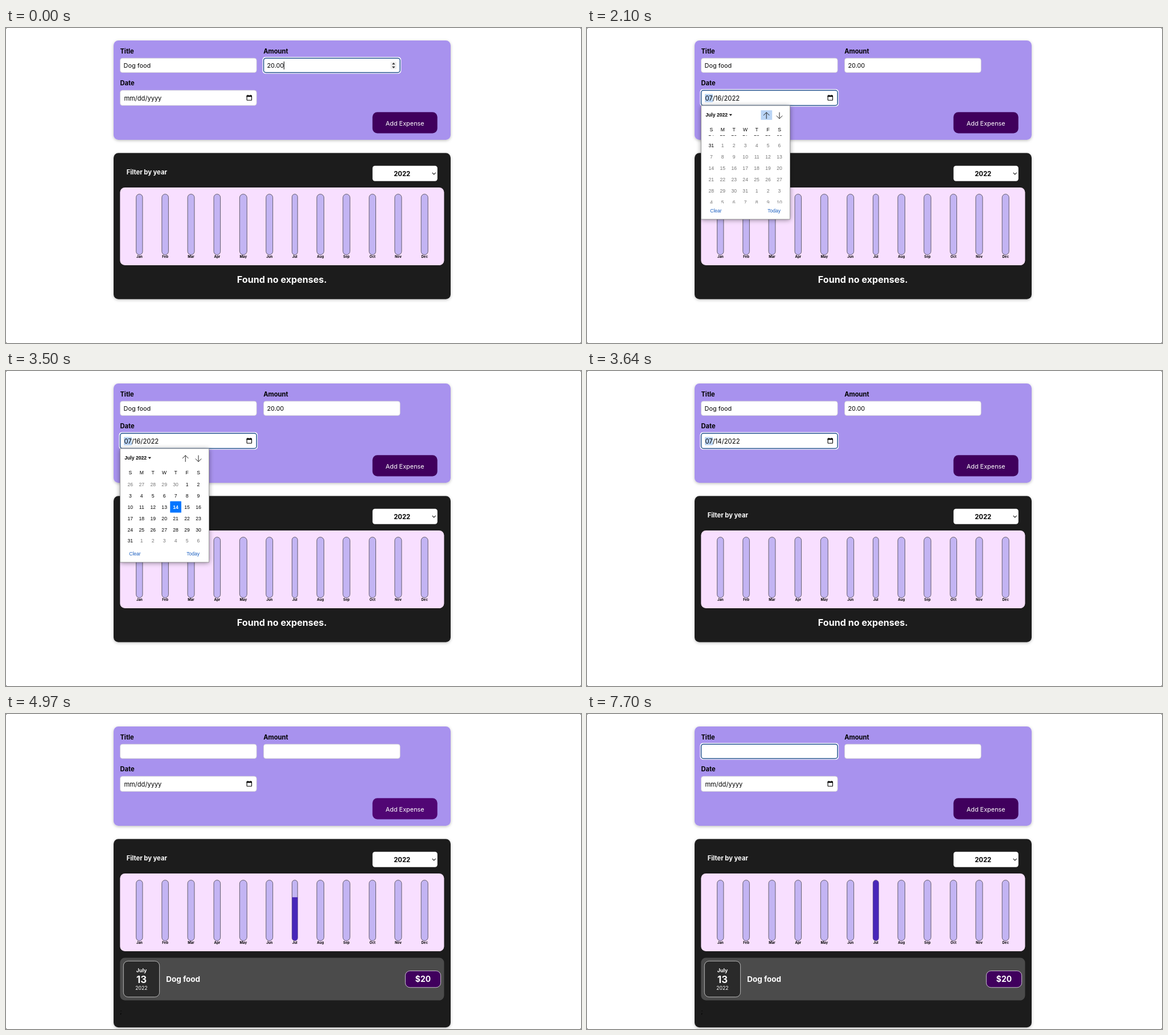
An HTML page that plays this animation: 1010 px wide and 555 px high, repeating every 8 s.

```html
<!DOCTYPE html>
<html lang="en">
<head>
<meta charset="utf-8">
<title>Expense tracker</title>
<style>
  html, body { margin: 0; width: 100%; height: 100%; overflow: hidden; background: #fff; }
  svg { display: block; font-family: Inter, "Open Sans", sans-serif; font-size: 10.9px; }
  .b { font-weight: 700; }
  .cal { font-family: "Liberation Sans", Arial, sans-serif; font-size: 8.6px; }
</style>
</head>
<body>
<svg id="stage" width="1010" height="555" viewBox="0 0 1010 555">
  <defs>
    <filter id="soft" x="-5%" y="-10%" width="110%" height="120%">
      <feDropShadow dx="0" dy="1.4" stdDeviation="2.8" flood-opacity=".26"/>
    </filter>
    <filter id="deep" x="-15%" y="-15%" width="130%" height="130%">
      <feDropShadow dx="0" dy="1" stdDeviation="4.5" flood-opacity=".45"/>
    </filter>
    <clipPath id="weeks"><rect x="202" y="189" width="153" height="120"/></clipPath>
    <clipPath id="july"><rect x="502.5" y="293" width="9.8" height="106.3" rx="4.9"/></clipPath>
  </defs>
  <g id="view"></g>
</svg>
<script>
const LOOP = 8000;
const MONTHS = 'Jan Feb Mar Apr May Jun Jul Aug Sep Oct Nov Dec'.split(' ');
const BAR_X = [234.3, 279.6, 325, 370.8, 416.8, 462.7, 507.3, 552.2, 598, 643.7, 688.9, 735.2];
const BAR_W = [12, 12.3, 12.6, 12.3, 13.6, 12.6, 10.5, 13.2, 13, 12.3, 12.8, 12.7];
const HOVER = '#b9d4f6', BLUE = '#0075ff';
const view = document.getElementById('view');

const clamp = (v, lo, hi) => Math.min(hi, Math.max(lo, v));
const rect = (x, y, w, h, r, fill, more = '') =>
  `<rect x="${x}" y="${y}" width="${w}" height="${h}" rx="${r}" fill="${fill}" ${more}/>`;
const text = (x, y, s, more = '') => `<text x="${x}" y="${y}" ${more}>${s}</text>`;
const mid = (x, y, s, more = '') => text(x, y, s, 'text-anchor="middle" ' + more);
const line = (d, color = '#000', w = 1) =>
  `<path d="${d}" fill="none" stroke="${color}" stroke-width="${w}"/>`;
const shape = (d, fill = '#000') => `<path d="${d}" fill="${fill}"/>`;
const bold = (size, fill = '#000') => `class="b" font-size="${size}" fill="${fill}"`;
const stroke = (color, w = .7) => `stroke="${color}" stroke-width="${w}"`;

function field(x, y, h, focused) {
  const ring = rect(x - 1.7, y - 1.7, 243.6, h + 3.4, 5, '#fff');
  return (focused ? ring : '') +
    rect(x + .35, y + .35, 239.6, h - .7, 4, '#fff', focused ? stroke('#23508f', 1.5) : stroke('#ccc'));
}

const caret = (x, y) => rect(x, y, 1, 14, 0, '#000');

function form(t) {
  const sent = t >= 4830;
  const onAmount = t < 910, onDate = t >= 910 && t < 4690, onTitle = t >= 6160;
  const date = t < 2030 || sent ? 'mm/dd/yyyy' : t < 3570 ? '07/16/2022' : '07/14/2022';
  const empty = date[0] === 'm';
  const hover = t >= 4480 && t < 5250;
  let s = rect(189, 22, 592, 175, 8.5, '#a892ee', 'filter="url(#soft)"') +
    text(200.4, 44.5, 'Title', bold(11.2)) + text(452.2, 44.5, 'Amount', bold(11.2)) +
    text(200.4, 101.4, 'Date', bold(11.2)) +
    field(200.2, 52.8, 26, onTitle) + field(452.2, 52.8, 26, onAmount) + field(200.2, 109.5, 27.3, onDate);

  if (!sent) s += text(206.6, 70, 'Dog food') + text(458.4, 70, '20.00');
  if (onAmount) {
    s += rect(675.5, 59.5, 10.5, 13, 1, '#efefef') +
      shape('M678 64.3l2.8-3.4 2.8 3.4zM678 67.7l2.8 3.4 2.8-3.4z', '#333');
    if (t < 420) s += caret(487.8, 59);
  }
  if (onTitle && (t < 6650 || t >= 7210 && t < 7700)) s += caret(206.6, 58.6);

  if (onDate) s += rect(207, 116.3, empty ? 20.3 : 14, 14.4, 0, HOVER);
  s += text(207.4, 127.8, date, `font-size="${empty ? 11.1 : 11.3}"`) +
    rect(423.1, 119.3, 8.4, 8, .6, 'none', stroke('#000', 1.1)) +
    shape('M422.6 118.8h9.4v2.5h-9.4zM424.2 117.8h1.2v1.5h-1.2zM429.2 117.8h1.2v1.5h-1.2z');

  return s + rect(643.7, 148.3, 114, 37.3, 8.5, hover ? '#510674' : '#40005d') +
    mid(700.7, 171.6, 'Add Expense', 'fill="#fff"');
}

function chart(t) {
  const k = clamp((t - 4830) / 300, 0, 1);
  const fill = 106.3 * (1 - (1 - k) ** 2);
  let s = rect(200.3, 281, 569.2, 137, 8.5, '#f8dfff');
  MONTHS.forEach((name, i) => {
    const w = BAR_W[i] - .7;
    s += rect(BAR_X[i] - w / 2, 292.7, w, 106.8, w / 2, '#c3b4f3', stroke('#313131')) +
      mid(BAR_X[i], 405.4, name, bold(6));
  });
  return s + rect(502, 399.3 - fill, 11, fill, 0, '#4826b9', 'clip-path="url(#july)"');
}

function expenses(t) {
  const filled = t >= 4830;
  const s = rect(189, 220.2, 592, filled ? 332 : 257.6, 8.5, '#1f1f1f', 'filter="url(#soft)"') +
    text(211.7, 257.9, 'Filter by year', bold(11.2, '#fff')) +
    rect(643.8, 242.8, 114, 27, 4.2, '#fff') + mid(695.7, 260.6, '2022', bold(11.3)) +
    line('M748.7 254.8l3 3.2 3-3.2', '#222', 1.1) + chart(t);
  if (!filled) return s + mid(484.8, 448.6, 'Found no expenses.', bold(16.1, '#fff'));
  return s + rect(200.3, 429.5, 569.2, 75, 8.5, '#4b4b4b') +
    rect(206.3, 435.3, 63.3, 63.3, 8.2, '#2a2a2a', stroke('#ececec')) +
    mid(238, 455.1, 'July', bold(8.8, '#fff')) + mid(238, 473.8, '13', bold(16.8, '#fff')) +
    mid(238, 485.7, '2022', 'font-size="8.7" fill="#fff"') +
    text(281.2, 472.4, 'Dog food', bold(13.5, '#fff')) +
    rect(701.4, 452.6, 62.2, 29.2, 8.2, '#40005d', stroke('#fff')) +
    mid(732.4, 472.4, '$20', bold(13.9, '#fff')) + text(200.3, 527.5, ';');
}

function picker(t) {
  if (t < 1050 || t >= 3640) return '';
  const month = t < 2030 ? 7 : 6;
  // Weeks are counted from June 26; the view slides from week 5 to week 0.
  const top = clamp((2450 - t) / 70 * .925, 0, 5);
  const picked = t < 3430 ? 16 : 14;
  const hoverRow = t >= 2660 && t < 3430 ? clamp(Math.floor((t - 2660) / 70), 0, 2) : -1;
  const arrowX = t < 1610 ? 0 : t < 1820 ? 328.3 : t < 2660 ? 305.4 : 0;
  const tri = month === 7 ? 261.8 : 249.6;

  let s = rect(200.6, 136.8, 156, 200.2, 0, '#fff', 'filter="url(#deep)"') +
    rect(200.6, 136.8, 156, 200.2, 0, '#fff', stroke('#777')) +
    text(208.3, 156, month === 7 ? 'August 2022' : 'July 2022', 'class="b"') +
    shape(`M${tri} 151.7h5.4l-2.7 3z`);
  if (arrowX) s += rect(arrowX, 145, 19.8, 16.8, 0, HOVER);
  s += line('M315.2 160v-11.2M310 154l5.2-5.3 5.2 5.3', '#222') +
    line('M338 148.5v11.2M332.8 154.5l5.2 5.3 5.2-5.3', '#222');

  let days = '';
  for (let i = 0; i < 77; i++) {
    const row = Math.floor(i / 7), col = i % 7;
    const x = 218.3 + col * 19.95, y = 199.6 + (row - top) * 19.95;
    if (y < 185 || y > 315) continue;
    const d = new Date(2022, 5, 26 + i), day = d.getDate(), here = d.getMonth() === month;
    const on = here && day === picked;
    if (on || col === 4 && row === hoverRow) days += rect(x - 9.8, y - 9.9, 19.6, 19.8, .5, on ? BLUE : HOVER);
    days += mid(x, y + 3.1, day, on ? 'class="b" fill="#fff"' : `fill="${here ? '#000' : '#757575'}"`);
  }
  s += [...'SMTWTFS'].map((c, i) => mid(218.3 + i * 19.95, 182.1, c)).join('') +
    `<g clip-path="url(#weeks)">${days}</g>` +
    text(216.2, 324.6, 'Clear', 'fill="#1a5fc0"') + text(317.2, 324.6, 'Today', 'fill="#1a5fc0"');
  return `<g class="cal" opacity="${t < 3570 ? 1 : .5}">${s}</g>`;
}

const backdrop = rect(0, 0, 1010, 555, 0, '#222') + rect(0, 0, 1010, 555, 2, '#fff');
let shown = '';
function draw() {
  const t = performance.now() % LOOP;
  const next = backdrop + form(t) + expenses(t) + picker(t);
  if (next !== shown) view.innerHTML = shown = next;
  requestAnimationFrame(draw);
}
draw();
</script>
</body>
</html>
```
